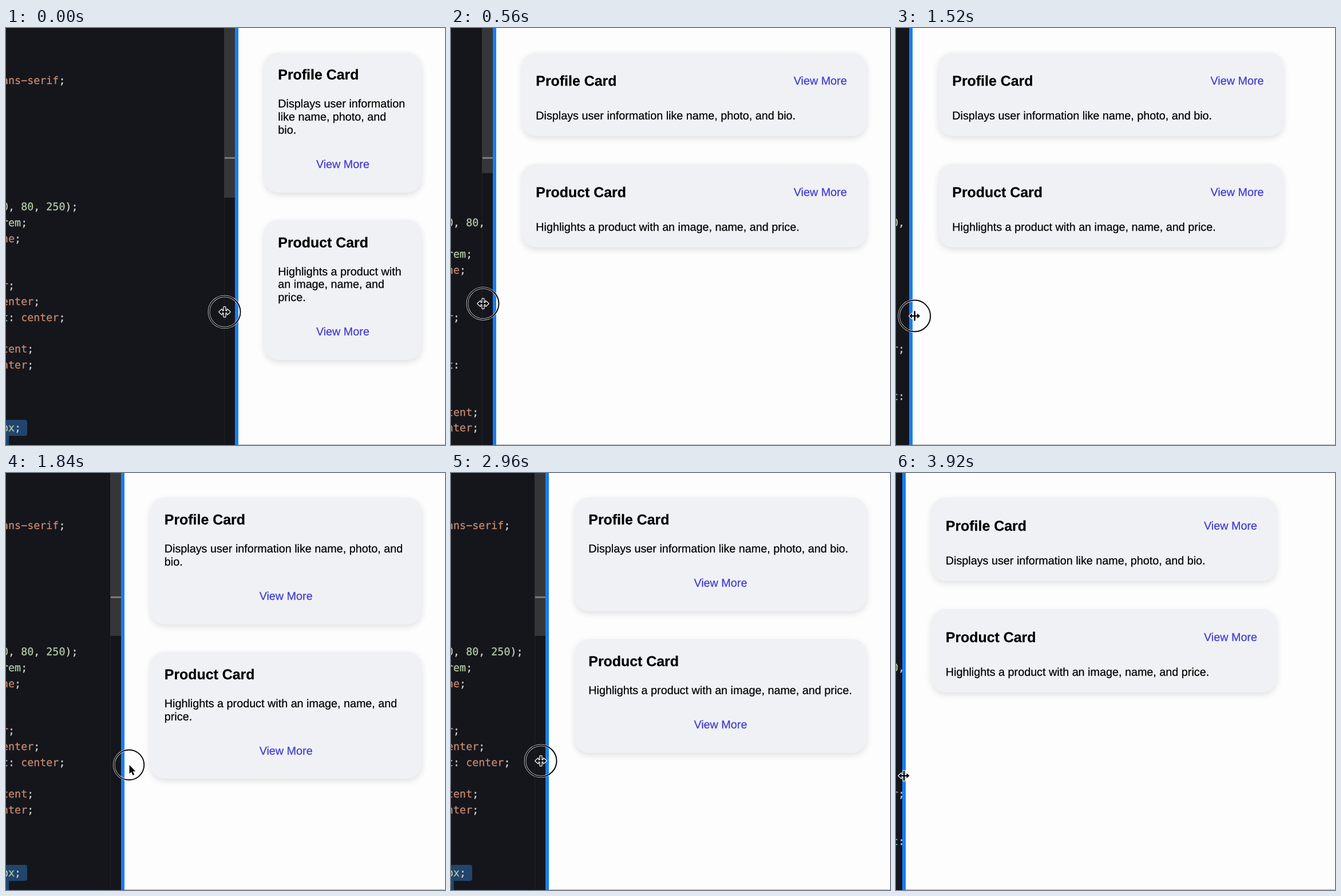
Animation of 767x730 px, one loop 4000 ms. Source, as an HTML page:

```html
<!DOCTYPE html>
<html lang="en">
<head>
<meta charset="utf-8">
<title>Resizable preview</title>
<style>
html, body { margin: 0; width: 100%; height: 100%; overflow: hidden; background: #15161c; }
#stage { position: relative; width: 767px; height: 730px; overflow: hidden; background: #15161c; text-rendering: geometricPrecision; -webkit-text-stroke: .25px currentColor; }
#stage > *, .row { position: absolute; }
.row { left: -7px; white-space: pre; font: 18.35px/27.65px "DejaVu Sans Mono", monospace; }
.o { color: #cb8a6f; }
.n { color: #b5cea8; }
.p { color: #d4d4d4; }
.c { color: #7fc4e8; }
#sel, #sel2 { left: 0; background: #22456c; }
#sel { width: 37px; height: 28px; border-radius: 0 4px 4px 0; }
#sel2 { width: 5px; height: 28px; }
#bar { top: 0; width: 18px; height: 730px; border-left: 1px solid #1f2127; }
#thumb { position: absolute; left: -1px; top: 0; width: 19px; background: #353639; }
#mark { position: absolute; left: 0; width: 18px; height: 3px; background: #7a7b7d; }
#split { top: 0; width: 6px; height: 730px; background: #167df8; }
#page { top: 0; right: 0; height: 729px; background: #fdfdfd; border-bottom: 1px solid #aaa; font: 19.77px/22.8px "Liberation Sans", Arial, sans-serif; color: #000; }
.card { position: absolute; left: 45.3px; box-sizing: border-box; padding: 25.3px 24.5px 36.9px; border-radius: 25px; background: #f0f1f5; box-shadow: 0 4px 12px rgba(0, 0, 0, .12); }
.card h3 { margin: 0 0 25.6px; font-size: 24.9px; line-height: 28.4px; white-space: nowrap; }
.card p { margin: 0 .4px 0 0; }
.card a { display: block; margin-top: 37.2px; text-align: center; color: #403cd2; }
.wide .card { padding-bottom: 23.2px; }
.wide h3 { padding-top: 11px; margin-bottom: 35.5px; }
.wide a { position: absolute; top: 39.2px; right: 34.3px; margin: 0; }
#mouse { left: 0; top: 0; }
</style>
</head>
<body>
<div id="stage">
  <div id="sel"></div><div id="sel2"></div>
  <div id="bar"><div id="thumb"></div><div id="mark"></div></div>
  <div id="code"></div>
  <div id="page">
    <div class="card"><h3>Profile Card</h3><p>Displays user information like name, photo, and bio.</p><a>View More</a></div>
    <div class="card"><h3>Product Card</h3><p>Highlights a product with an image, name, and price.</p><a>View More</a></div>
  </div>
  <div id="split"></div>
  <svg id="mouse" width="767" height="730">
    <g id="pointer">
      <g id="ring" fill="none">
        <circle r="27.5" stroke="#fff" stroke-opacity=".85" stroke-width="3.6"/>
        <circle r="27.5" stroke="#08080a" stroke-width="2"/>
      </g>
      <path id="resize" fill="#08080a" stroke="#fff" stroke-width="2.4" stroke-linejoin="round" paint-order="stroke"
        d="M-9.5 0L-4.5-4.5V-1.2H-1.3V-8.5H1.3V-1.2H4.5V-4.5L9.5 0L4.5 4.5V1.2H1.3V8.5H-1.3V1.2H-4.5V4.5Z"/>
      <path id="arrow" fill="#08080a" stroke="#fff" stroke-width="2.4" stroke-linejoin="round" paint-order="stroke"
        d="M.5 0V15.5L4 12.2L6.6 18.2L9.2 17.1L6.6 11.2H11.3Z"/>
    </g>
  </svg>
</div>
<script>
const LOOP = 4000, STEP = 80, ROW = 27.65, TOP = 79;
const $ = id => document.getElementById(id);

// time, divider x, pointer x, pointer y
const keys = [
  [0, 399.5, 382, 497], [280, 236, 218, 489], [560, 72.5, 56, 482.5],
  [720, 8, 6, 485], [880, -4, 2, 489], [1200, -3, 4.5, 495.5],
  [1440, 6, 14, 502], [1680, 92, 110, 508], [1840, 201, 215, 511],
  [2080, 286, 294, 515], [2320, 321, 325, 517], [2480, 319.5, 322, 516],
  [2720, 264, 257, 511], [2960, 164.5, 157, 504], [3200, 60, 52, 508],
  [3360, 9, 9, 515], [3600, 3, 6, 524], [3920, 11, 14, 530]
];

// row, then [text, colour, pane width below which it wraps away]
const lines = [
  [0, ['ans−serif', 'o', 105], [';', 'p', 105]],
  [8, ['0', 'n', 0], [', ', 'p', 0], ['80', 'n', 45], [', ', 'p', 45], ['250', 'n', 115], [');', 'p', 115]],
  [9, ['rem', 'n', 38], [';', 'p', 38]],
  [10, ['ne', 'o', 27], [';', 'p', 27]],
  [13, ['r', 'o', 0], [';', 'p', 0]],
  [14, ['enter', 'o', 59], [';', 'p', 59]],
  [15, ['t', 'c', 0], [': ', 'p', 0], ['center', 'o', 103], [';', 'p', 103]],
  [17, ['tent', 'o', 48], [';', 'p', 48]],
  [18, ['nter', 'o', 48], [';', 'p', 48]],
  [22, ['px', 'n', 26], [';', 'p', 26]]
].map(([row, ...parts]) => {
  const el = document.createElement('div');
  el.className = 'row';
  $('code').append(el);
  return { row, el, parts: parts.map(([text, cls, min]) => {
    const span = document.createElement('span');
    span.className = cls;
    span.textContent = text;
    el.append(span);
    return { span, min };
  }) };
});

// divider limit, thumb height, mark y
const thumbs = [[350, 297, 225.5], [260, 294, 223], [130, 285, 215.5], [-99, 254, 225.5]];
const cards = document.querySelectorAll('.card');

function slope(i, k) {
  const a = keys[i - 1], b = keys[i], c = keys[i + 1];
  if (!a) return (c[k] - b[k]) / (c[0] - b[0]);
  if (!c) return (b[k] - a[k]) / (b[0] - a[0]);
  const u = (b[k] - a[k]) / (b[0] - a[0]), v = (c[k] - b[k]) / (c[0] - b[0]);
  return u * v > 0 ? 2 * u * v / (u + v) : 0;
}

// Monotone cubic through the keys
function at(t, k) {
  let i = 0;
  while (i < keys.length - 2 && t > keys[i + 1][0]) i++;
  const a = keys[i], b = keys[i + 1], h = b[0] - a[0], s = (t - a[0]) / h, q = 1 - s;
  return a[k] * (1 + 2 * s) * q * q + b[k] * s * s * (3 - 2 * s)
    + h * s * q * (slope(i, k) * q - slope(i + 1, k) * s);
}

function drawCode(x) {
  const width = Math.max(0, x - 19);
  let extra = 0;
  for (const { row, el, parts } of lines) {
    const y = TOP + ROW * (row + extra);
    el.style.top = y + 'px';
    let wrapped = 0;
    for (const { span, min } of parts) {
      const hide = width < min;
      span.style.display = hide ? 'none' : '';
      if (hide) wrapped = 1;
    }
    extra += wrapped;
    if (row === 22) {
      $('sel').style.top = y - 1 + 'px';
      $('sel2').style.top = y + ROW - 1 + 'px';
    }
  }
  const [, height, mark] = thumbs.find(s => x > s[0]);
  $('bar').style.display = x < 30 ? 'none' : '';
  $('bar').style.left = x - 19 + 'px';
  $('thumb').style.height = height + 'px';
  $('mark').style.top = mark + 'px';
}

function drawPage(x) {
  const edge = x + 6;
  $('split').style.left = x + 'px';
  $('page').style.left = edge + 'px';
  $('page').className = edge < 138 ? 'wide' : '';
  let y = 43;
  for (const card of cards) {
    card.style.width = Math.min(603, 726 - edge - 45.3) + 'px';
    card.style.top = y + 'px';
    y += card.getBoundingClientRect().height + 48.7;
  }
}

function drawPointer(t) {
  const arrow = t >= 1760 && t < 1920;
  $('pointer').setAttribute('transform', `translate(${at(t, 2)} ${at(t, 3)})`);
  $('ring').setAttribute('transform', `scale(${arrow ? .955 : 1})`);
  $('ring').style.display = t < 3760 ? '' : 'none';
  $('arrow').style.display = arrow ? '' : 'none';
  $('resize').style.display = arrow ? 'none' : '';
}

function frame(now) {
  const t = Math.floor(now % LOOP / STEP) * STEP;
  const x = Math.round(at(t, 1) * 2) / 2;
  drawCode(x);
  drawPage(x);
  drawPointer(t);
}

const start = performance.now();
(function tick() {
  frame(performance.now() - start);
  requestAnimationFrame(tick);
})();
</script>
</body>
</html>
```
